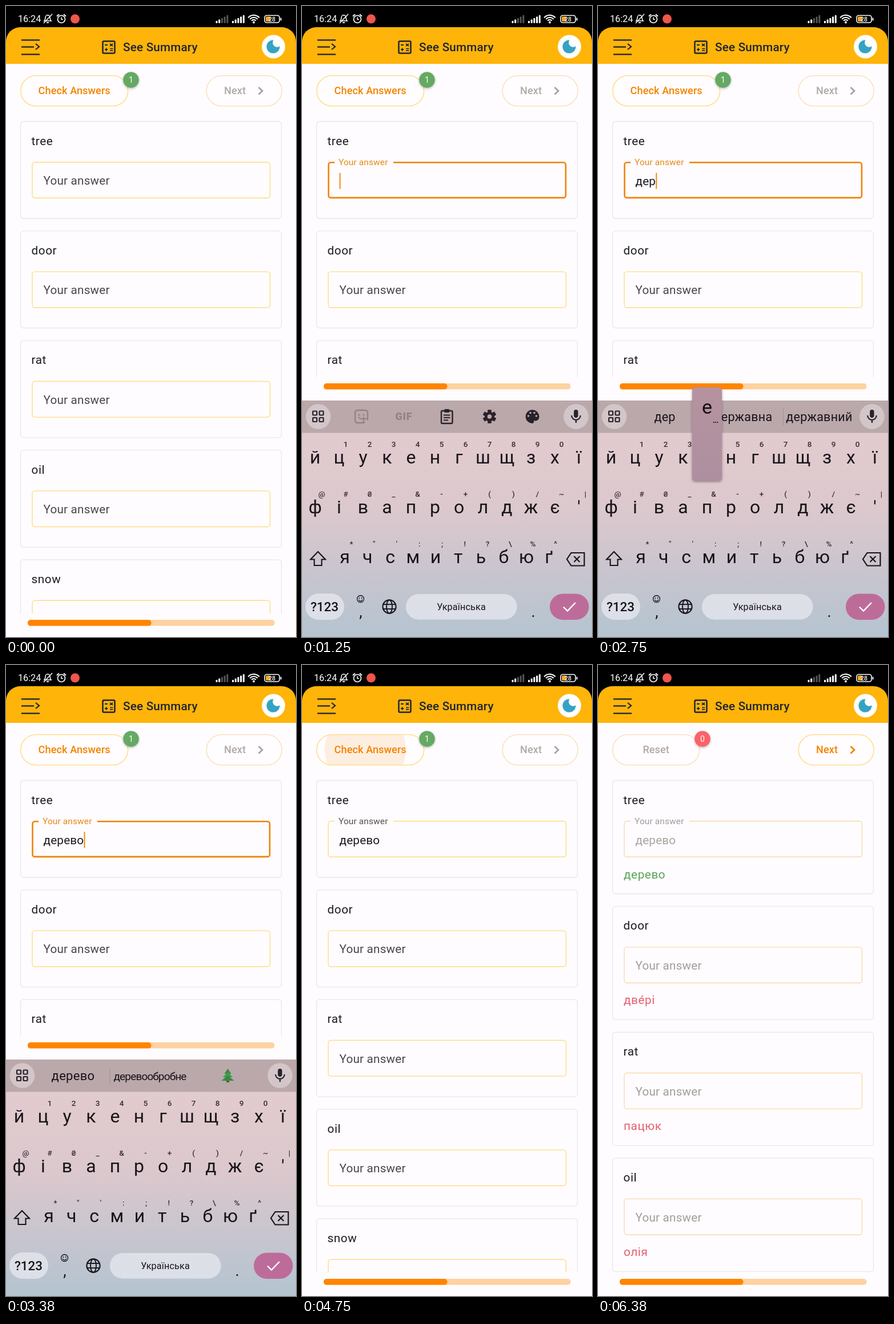
Write an HTML page with a canvas that moves like this. It is 508 px wide and 1102 px high and loops after 6510 ms.

```html
<!DOCTYPE html>
<html lang="en">
<head>
<meta charset="utf-8">
<title>Vocabulary test</title>
<style>
html, body { margin: 0; width: 100%; height: 100%; overflow: hidden; background: #fffcff; }
canvas { display: block; width: 508px; height: 1102px; }
</style>
</head>
<body>
<canvas id="stage"></canvas>
<script>
const W = 508, H = 1102, LOOP = 6510, STEP = 125, TAU = Math.PI * 2;
const BG = '#fefcfe', ORANGE = '#f58300', INK = '#1b1b1f', KEY = '#17141a';
const cv = document.getElementById('stage'), c = cv.getContext('2d');
const dpr = window.devicePixelRatio || 1;
cv.width = W * dpr;
cv.height = H * dpr;

const clamp = v => Math.max(0, Math.min(1, v));
const ramp = (t, a, b) => clamp((t - a) / (b - a));
const mix = (a, b, p) => a + (b - a) * p;

// Drawing helpers
function text(s, x, y, size, color, o = {}) {
  c.font = `${o.weight || 400} ${size}px Roboto, sans-serif`;
  c.letterSpacing = (o.gap || 0) + 'px';
  c.textAlign = o.align || 'left';
  c.fillStyle = color;
  c.fillText(s, x, y);
  return c.measureText(s).width;
}
const mid = (s, x, y, size, color, o = {}) => text(s, x, y, size, color, { ...o, align: 'center' });

function paint(fill, stroke, lw) {
  if (fill) { c.fillStyle = fill; c.fill(); }
  if (stroke) { c.strokeStyle = stroke; c.lineWidth = lw; c.stroke(); }
}
function box(x, y, w, h, r, fill, stroke, lw = 1.3) {
  c.beginPath();
  c.roundRect(x, y, w, h, r);
  paint(fill, stroke, lw);
}
function disc(x, y, r, fill, stroke, lw = 2) {
  c.beginPath();
  c.arc(x, y, r, 0, TAU);
  paint(fill, stroke, lw);
}
function arc(x, y, r, a, b, color, lw) {
  c.beginPath();
  c.arc(x, y, r, a, b);
  paint(null, color, lw);
}
function line(color, lw, ...p) {
  c.beginPath();
  for (let i = 0; i < p.length; i += 2) c.lineTo(p[i], p[i + 1]);
  paint(null, color, lw);
}
function shape(fill, ...p) {
  c.beginPath();
  for (let i = 0; i < p.length; i += 2) c.lineTo(p[i], p[i + 1]);
  c.closePath();
  paint(fill);
}
function shaded(color, blur, dy, draw) {
  c.save();
  c.shadowColor = color;
  c.shadowBlur = blur * dpr;
  c.shadowOffsetY = dy * dpr;
  draw();
  c.restore();
}

// Status bar and header
function bars(x, lit) {
  for (let i = 0; i < 5; i++) {
    const h = 4 + i * 2.5;
    box(x + i * 4.7, 30 - h, 3, h, 1, i < lit ? '#fff' : '#555');
  }
}
function statusBar() {
  c.fillStyle = '#000';
  c.fillRect(0, 0, W, 62);
  text('16:24', 21, 28, 16.2, '#fff');
  // muted bell
  c.beginPath();
  c.moveTo(67, 26);
  c.quadraticCurveTo(69, 24, 69, 20);
  c.arc(73, 20, 4, Math.PI, 0);
  c.quadraticCurveTo(77, 24, 79, 26);
  c.closePath();
  paint(null, '#fff', 1.5);
  line('#fff', 1.8, 71, 29, 75, 29);
  line('#fff', 1.5, 66, 30, 81, 14);
  // alarm clock
  disc(97, 23, 6.5, null, '#fff', 1.7);
  line('#fff', 1.5, 97, 19.5, 97, 23.5, 100, 23.5);
  line('#fff', 2, 89, 18, 93, 14.5);
  line('#fff', 2, 105, 18, 101, 14.5);
  disc(121, 22.5, 8, '#f0564b');
  bars(367.5, 2);
  bars(396, 5);
  for (const r of [5, 9, 13]) arc(434, 29, r, -Math.PI * .77, -Math.PI * .23, '#fff', 2.2);
  disc(434, 28.5, 2, '#fff');
  box(453, 16.5, 26, 12.5, 3.5, null, '#fff', 1.6);
  box(455, 18.5, 8, 8.5, 1.5, '#f7a823');
  box(480.5, 20.5, 2, 5, 1, '#fff');
  mid('28', 466, 26.6, 10.5, '#fff', { weight: 500 });
}
function header() {
  const ink = '#1d2430';
  box(0, 37, W, 64, [25, 25, 0, 0], '#ffb409');
  line(ink, 2.3, 27, 59.5, 59, 59.5);
  line(ink, 2.3, 27, 71.5, 49, 71.5);
  line(ink, 2.3, 27, 84.5, 59, 84.5);
  line(ink, 2.2, 52, 66, 58, 71, 52, 76);
  // calculator
  box(169.5, 61.5, 21, 21, 2, null, ink, 2.5);
  line(ink, 2, 173, 68, 178, 68);
  line(ink, 1.8, 182, 66, 187, 70);
  line(ink, 1.8, 187, 66, 182, 70);
  line(ink, 1.8, 173, 76, 178.4, 76);
  line(ink, 1.8, 175.7, 73.3, 175.7, 78.7);
  line(ink, 1.7, 182, 74.5, 187.4, 74.5);
  line(ink, 1.7, 182, 77.8, 187.4, 77.8);
  text('See Summary', 205, 79, 20.7, ink, { weight: 500, gap: .2 });
  // theme switch
  disc(468.5, 71, 20.5, '#fff');
  disc(468, 71, 11.6, '#35a3c4');
  disc(475, 64, 7.8, '#fff');
}

// Page content
function badge(x, s, color) {
  shaded('rgba(0,0,0,.28)', 4, 1.5, () => disc(x, 129, 13.8, color));
  mid(s, x, 134, 14.2, '#fff');
}
function buttons(t, done) {
  const grey = '#b2aaa5', pale = '#fbdcb4', gold = '#ffd978';
  const w = done ? 152 : 188;
  box(25.7, 121.7, w, 53, 26.5, '#fffdff');
  const p = ramp(t, T.check - 90, T.check + 130);
  if (!done && p > 0) {
    c.save();
    c.beginPath();
    c.roundRect(25.7, 121.7, w, 53, 26.5);
    c.clip();
    disc(111, 148, mix(20, 71, p) + 50 * ramp(t, T.check + 130, T.check + 300),
      `rgba(250,205,160,${.32 * (1 - ramp(t, T.check + 200, T.check + 480))})`);
    c.restore();
  }
  box(25.7, 121.7, w, 53, 26.5, null, done ? pale : gold);
  mid(done ? 'Reset' : 'Check Answers', 25.7 + w / 2, 154, 18.1, done ? grey : ORANGE, { weight: 500, gap: .1 });
  badge(done ? 183 : 219, done ? '0' : '1', done ? '#fb6269' : '#64aa63');
  box(351.2, 121.7, 132, 53, 26.5, '#fffdff', done ? gold : pale);
  const col = done ? ORANGE : grey;
  text('Next', 382, 154, 18.1, col, { weight: 500, gap: .1 });
  line(done ? ORANGE : '#aaa39e', 2.8, 442.5, 142, 449, 148.3, 442.5, 154.6);
}

const WORDS = [['tree', 'дерево'], ['door', 'две\u0301рі'], ['rat', 'пацюк'], ['oil', 'олія'], ['snow', 'сніг']];

function card(i, t, done) {
  const y = 201.5 + i * (done ? 219.9 : 191.4), h = done ? 198 : 169.5;
  const [word, answer] = WORDS[i];
  const active = i === 0 && t >= T.focus && t < T.check;
  const up = i === 0 ? ramp(t, T.focus, T.focus + 150) : 0;
  const typed = i === 0 ? typedAt(t) : '';
  box(25.5, y, 457, h, 5, '#fefcff', '#e9e7ea', 1.3);
  text(word, 44.5, y + 41, 20.7, INK, { gap: .6 });
  if (active) box(46.5, y + 71.8, 415.5, 61.6, 4, null, '#f08205', 2.6);
  else box(46, y + 71.2, 416.5, 62.6, 4.5, null, done ? '#fad9ae' : '#ffdc84', 1.4);
  if (up > 0) {
    const w = 103 * up;
    c.fillStyle = BG;
    c.fillRect(108.5 - w / 2, y + 68, w, 7);
  }
  const tint = done ? '#a39d99' : active ? '#e58a17' : up ? '#59504a' : '#4a464c';
  text('Your answer', mix(65.5, 64, up), mix(y + 110.5, y + 76, up), mix(20.7, 15.5, up), tint, { gap: mix(.2, .1, up) });
  const w = typed ? text(typed, 65.5, y + 111, 20.7, done ? '#aaa4a0' : INK, { gap: .2 }) : 0;
  if (active && caretOn(t)) box(65.6 + w, y + 90, 2, 28, 0, '#f08a14');
  if (done) text(answer, 45, y + 171, 20.7, i ? '#e2616d' : '#5ba25a', { gap: .6 });
}

function page(t, bottom) {
  const done = t >= T.result;
  buttons(t, done);
  c.save();
  c.beginPath();
  c.rect(0, 190, W, bottom - 41 - 190);
  c.clip();
  WORDS.forEach((_, i) => card(i, t, done));
  c.restore();
  box(38, bottom - 30, 432.5, 10.6, 5, '#ffd2a1');
  box(38, bottom - 30, 216.5, 10.6, 5, '#ff8500');
}

// Timing
const T = { focus: 375, show: 790, shown: 1000, hide: 3938, hidden: 4188, check: 4620, result: 5125 };
const ANSWER = 'дерево', STROKES = [1750, 2125, 2625, 2875, 3125, 3375];
const typedAt = t => ANSWER.slice(0, STROKES.filter(s => s <= t).length);
function caretOn(t) {
  const last = [T.shown, ...STROKES].filter(s => s <= t).pop();
  return last !== undefined && (t - last) % 1000 < 500;
}

// Keyboard, drawn relative to its top edge
const ROWS = [
  { keys: 'йцукенгшщзхї', hints: '1234567890', x: 23, dx: 42, y: 110 },
  { keys: "фівапролджє'", hints: '@#₴_&-+()/~|', x: 23, dx: 42, y: 197 },
  { keys: 'ячсмитьбюґ', hints: '*"\':;!?\\%^', x: 75, dx: 39.75, y: 284 }
];
const SUGGEST = {
  'д': ['д', 'для', 'до'],
  'де': ['де', 'день', 'десь'],
  'дер': ['дер', 'державна', 'державний'],
  'дере': ['дере', 'дерева', 'дерево'],
  'дерев': ['дерев', 'дерева', 'дерево']
};

function tools() {
  const dim = '#918388', ink = '#28222a';
  box(93, 17, 22, 22, 4, null, dim, 2.4);
  shape('#bba8ab', 108, 41, 117, 32, 117, 41);
  line(dim, 2.2, 108, 39, 108, 32, 115, 32);
  disc(100, 25, 1.6, dim);
  disc(108, 25, 1.6, dim);
  arc(104, 27, 5, .3, Math.PI - .3, dim, 2);
  mid('GIF', 178.5, 34, 18, dim, { weight: 900, gap: .8 });
  // clipboard
  box(244, 18, 19.5, 22, 2, null, ink, 2.4);
  box(249, 15, 9.5, 6, 2, ink);
  for (let i = 0; i < 3; i++) line(ink, 2, 248, 25.5 + i * 4.4, i < 2 ? 259.5 : 256, 25.5 + i * 4.4);
  // gear
  for (let i = 0; i < 6; i++) {
    const a = i * TAU / 6 + TAU / 12;
    line(ink, 6.5, 328.5, 28, 328.5 + 11.8 * Math.cos(a), 28 + 11.8 * Math.sin(a));
  }
  disc(328.5, 28, 8.6, ink);
  disc(328.5, 28, 3.8, '#bba8ab');
  // palette
  disc(403.5, 28, 11.8, ink);
  shape('#bba8ab', 405, 41, 405, 33, 416, 33, 416, 41);
  disc(409, 29, 6.4, ink);
  disc(403, 36, 3.4, ink);
  for (const [x, y] of [[396.5, 27], [400, 21.5], [407, 21.5], [410.5, 27]]) disc(x, y, 1.8, '#bba8ab');
}

function strip(typed) {
  c.fillStyle = '#bba8ab';
  c.fillRect(0, 0, W, 56.5);
  disc(28.5, 28, 21.8, '#d3c6c9');
  disc(480, 28, 21.8, '#d3c6c9');
  for (const x of [19, 30.5]) for (const y of [18.5, 30]) box(x, y, 7, 7, 1, null, '#28222a', 2.2);
  box(476.2, 16, 7.4, 14, 3.7, '#28222a');
  arc(480, 26, 7.8, 0, Math.PI, '#28222a', 2.2);
  line('#28222a', 2.4, 480, 33, 480, 39);
  if (!typed) return tools();
  const sep = x => line('#a59598', 1.2, x, 14, x, 44);
  sep(182);
  if (typed === ANSWER) {
    mid(typed, 117.5, 36, 22, KEY, { gap: .3 });
    mid('деревообробне', 252, 36, 19, KEY, { gap: -.85 });
    shape('#795039', 386, 34, 391, 34, 391, 40, 386, 40);
    for (let i = 0; i < 3; i++) {
      const y = 16 + i * 6, r = 6 + i * 2.6;
      shape(i % 2 ? '#3f9b4b' : '#338b42', 388.5, y, 388.5 + r, y + 9, 388.5 - r, y + 9);
    }
    return;
  }
  sep(324.5);
  SUGGEST[typed].forEach((s, i) => mid(s, [117, 254, 387.5][i], 36, 21.6, KEY, { gap: .2 }));
}

function popup(ch) {
  const row = ROWS.find(r => r.keys.includes(ch));
  const x = row.x + row.dx * row.keys.indexOf(ch), y = row.y - 133;
  const g = c.createLinearGradient(0, y, 0, y + 163);
  g.addColorStop(0, '#b6929f');
  g.addColorStop(1, '#ad90a0');
  shaded('rgba(60,30,50,.45)', 4, 2, () => box(x - 26, y, 52, 163, 5, g));
  mid(ch, x, y + 46, 34, '#120d12');
  mid('…', x + 15, y + 62, 15, '#120d12', { weight: 500 });
}

function bottomRow() {
  const pill = 'rgba(240,241,247,.62)';
  box(6, 337, 68, 46, 23, pill);
  mid('?123', 39.5, 368, 22.4, KEY, { weight: 500 });
  disc(102.5, 346.5, 6, null, KEY, 1.3);
  disc(100.3, 345, 1, KEY);
  disc(104.7, 345, 1, KEY);
  arc(102.5, 347, 3.2, .2, Math.PI - .2, KEY, 1.2);
  mid(',', 103, 378, 27, KEY);
  // globe
  disc(153, 360, 11.6, null, KEY, 2.1);
  c.beginPath();
  c.ellipse(153, 360, 5, 11.6, 0, 0, TAU);
  paint(null, KEY, 1.9);
  line(KEY, 1.9, 142.5, 356, 163.5, 356);
  line(KEY, 1.9, 142.5, 364, 163.5, 364);
  box(182, 338, 194.5, 44.5, 22, pill);
  mid('Українська', 279, 365.5, 16.3, KEY, { gap: .1 });
  mid('.', 405, 378, 27, KEY);
  box(434, 337.5, 68.5, 45.5, 22.7, '#bd6c9a');
  line('#fff', 2.4, 458, 360.5, 465, 367.5, 479, 353);
}

function keyboard(t, p) {
  const typed = typedAt(t);
  c.save();
  c.translate(0, 689 + 72 * (1 - p));
  const g = c.createLinearGradient(0, 56, 0, 413);
  g.addColorStop(0, '#e2cbce');
  g.addColorStop(.4, '#dbc8cd');
  g.addColorStop(.65, '#cbc5ce');
  g.addColorStop(1, '#b4c4d0');
  c.fillStyle = g;
  c.fillRect(0, 56, W, 413);
  strip(typed);
  for (const r of ROWS) {
    [...r.keys].forEach((k, i) => mid(k, r.x + r.dx * i, r.y, 32, KEY));
    const shift = r === ROWS[0] ? 1 : 0;
    [...r.hints].forEach((k, i) =>
      mid(k, r.x + r.dx * (i + shift) + 11.5, r.y - 29, 13.5, '#332c33', { weight: 500 }));
  }
  // shift and backspace
  line(KEY, 2.1, 28, 264, 41, 277.5, 34.5, 277.5, 34.5, 288, 21.5, 288, 21.5, 277.5, 15, 277.5, 28, 264, 29, 265);
  line(KEY, 2.2, 464, 277, 471.5, 266, 494.5, 266, 494.5, 288.5, 471.5, 288.5, 464, 277, 465, 275.5);
  line(KEY, 2.2, 476.5, 272, 486.5, 282);
  line(KEY, 2.2, 486.5, 272, 476.5, 282);
  bottomRow();
  const next = STROKES.findIndex(s => t >= s - STEP && t < s);
  if (next >= 0) popup(ANSWER[next]);
  if (p < 1) {
    c.globalAlpha = 1 - p;
    c.fillStyle = BG;
    c.fillRect(0, 0, W, 413);
  }
  c.restore();
}

function draw(t) {
  c.setTransform(dpr, 0, 0, dpr, 0, 0);
  c.fillStyle = BG;
  c.fillRect(0, 0, W, H);
  statusBar();
  header();
  const p = ramp(t, T.show, T.shown) - ramp(t, T.hide, T.hidden);
  page(t, p > 0 ? 689 : H);
  if (p > 0) keyboard(t, p);
}

const start = performance.now();
function tick() {
  const t = (performance.now() - start) % LOOP;
  draw(Math.min(51, Math.floor(Math.floor(t / 10) / 12.5)) * STEP);
  requestAnimationFrame(tick);
}
tick();
</script>
</body>
</html>
```
